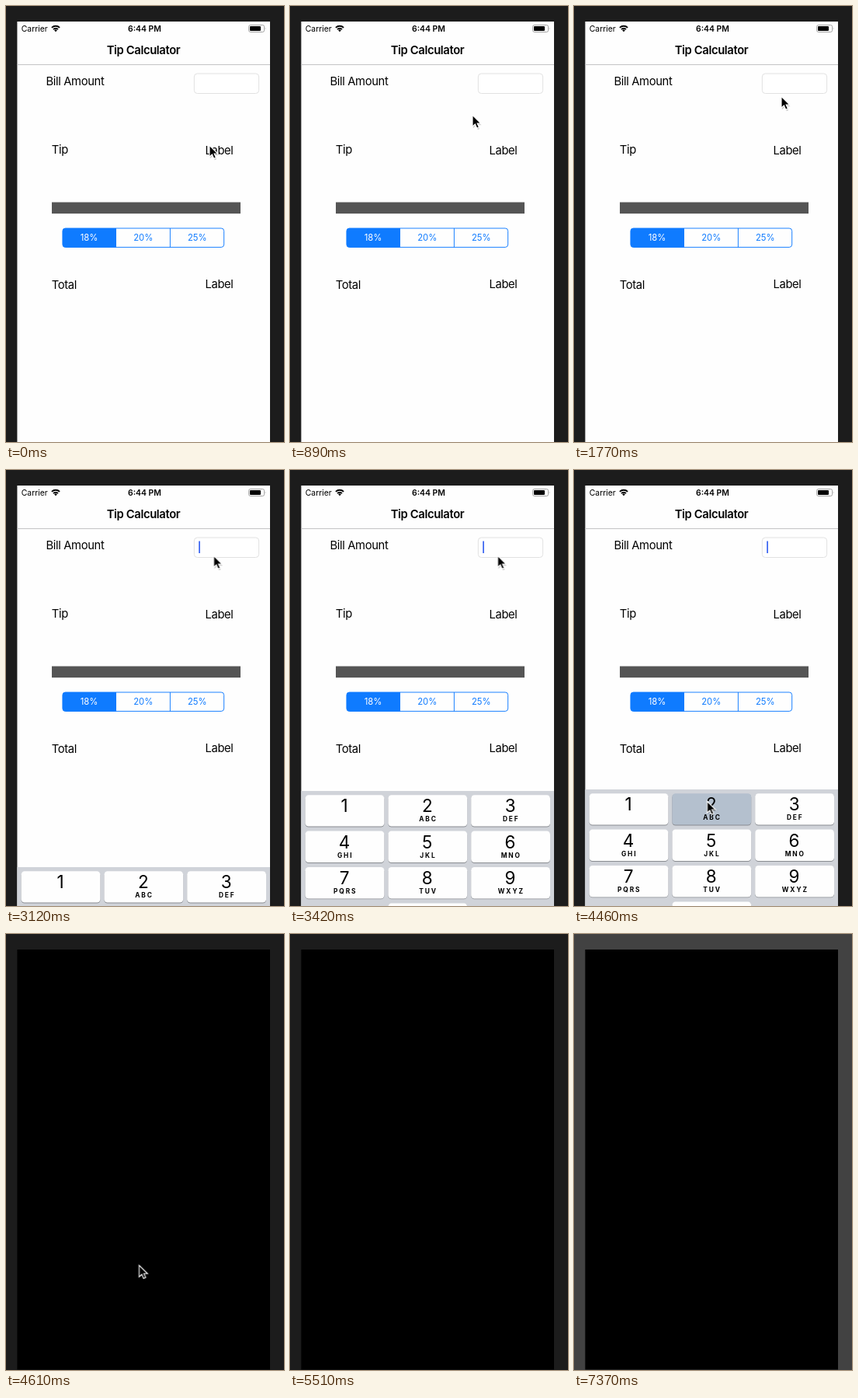
These frames come from a looping animation (358 by 561 pixels, 7.47 s). An HTML page:

```html
<!DOCTYPE html>
<html lang="en">
<head>
<meta charset="utf-8">
<title>Tip Calculator</title>
<style>
html, body { margin: 0; width: 100%; height: 100%; overflow: hidden; background: #1c1c1c; }
svg { display: block; width: 358px; height: 561px; font-family: Inter, Roboto, sans-serif; }
.label { font-size: 14.77px; letter-spacing: -.356px; }
.title { font-weight: 600; }
.status { font-size: 10.43px; }
.mid { text-anchor: middle; }
.segment { font-size: 11.3px; fill: #0f7bff; }
.digit { font-size: 22.5px; }
.letters { font-size: 8.4px; font-weight: 700; letter-spacing: 1.9px; }
.anim { animation: 7470ms step-end infinite; }
#frame { fill: #1c1c1c; animation-name: flash; }
#screen { animation-name: crash; }
#caret { animation-name: caret; }
#keyboard { animation-name: slide; }
#key2 { animation-name: press; }
#cursor { animation-name: move; }

@keyframes flash { 0% { fill: #1c1c1c } 98.66%, 100% { fill: #424242 } }
@keyframes crash { 0% { visibility: visible } 61.71%, 100% { visibility: hidden } }
@keyframes caret { 0% { opacity: 0 } 41.76%, 100% { opacity: 1 } }
@keyframes press { 0% { fill: #fefefe } 59.7%, 100% { fill: #b4c0ce } }
@keyframes slide {
  0% { transform: translateY(160px) }
  41.76% { transform: translateY(100px) }
  43.77% { transform: translateY(14px) }
  45.78% { transform: translateY(2px) }
  47.79%, 100% { transform: none }
}
@keyframes move {
  0% { transform: translate(262px, 179px) }
  2% { transform: translate(244px, 164px) }
  4.01% { transform: translate(229px, 151px) }
  6.02% { transform: translate(232px, 154px) }
  10.04% { transform: translate(235px, 140px) }
  12.04% { transform: translate(243px, 120px) }
  14.05% { transform: translate(252px, 98px) }
  16.06% { transform: translate(258px, 84px) }
  18.07% { transform: translate(261px, 81px) }
  20.08% { transform: translate(264px, 92px) }
  21.68% { transform: translate(266px, 106px) }
  23.69% { transform: translate(267px, 116px) }
  25.7% { transform: translate(265px, 107px) }
  27.71% { transform: translate(263px, 100px) }
  29.71% { transform: translate(265px, 104px) }
  31.72% { transform: translate(267.5px, 110px) }
  47.79% { transform: translate(258px, 165px) }
  49.79% { transform: translate(232px, 255px) }
  51.8% { transform: translate(203px, 345px) }
  53.68% { transform: translate(181px, 405px) }
  55.68% { transform: translate(172px, 424px) }
  57.69% { transform: translate(171.5px, 426px) }
  69.74% { transform: translate(214px, 462px) }
  71.75% { transform: translate(268px, 516px) }
  73.76%, 100% { transform: translate(400px, 600px) }
}
</style>
</head>
<body>
<svg viewBox="0 0 358 561">
  <rect id="frame" class="anim" width="358" height="561"/>
  <rect x="14.4" y="20" width="325.6" height="540.5"/>

  <g id="screen" class="anim">
    <rect x="14.4" y="20" width="325.6" height="541" fill="#fefefe"/>

    <text class="status" x="19.7" y="32.7">Carrier</text>
    <g fill="none" stroke="#000" stroke-width="1.9">
      <path d="M58.9 27.9A7.3 7.3 0 0 1 69.1 27.9M61 30.1A4.4 4.4 0 0 1 67 30.1"/>
    </g>
    <path d="M64 33.2l-1.9-1.9a2.7 2.7 0 0 1 3.8 0z"/>
    <text class="status title mid" x="178.5" y="32.7">6:44 PM</text>
    <rect x="312.6" y="24.5" width="20" height="9" rx="2.2" fill="none" stroke="#999" stroke-width=".9"/>
    <rect x="314" y="25.9" width="14" height="6.2" rx="1"/>
    <path d="M333.8 27.5q1.3 1.5 0 3z" fill="#999"/>

    <text class="label title mid" x="177" y="62">Tip Calculator</text>
    <rect x="14.4" y="75" width="325.6" height="1" fill="#c3c3c5"/>

    <g class="label">
      <text x="51.5" y="102.4">Bill Amount</text>
      <text x="58.8" y="190.4">Tip</text>
      <text x="256.5" y="191.4">Label</text>
      <text x="58.8" y="364.2">Total</text>
      <text x="256.5" y="363.2">Label</text>
    </g>
    <rect x="242.4" y="87" width="83.2" height="25.5" rx="4" fill="#fff" stroke="#dedede" stroke-width=".9"/>
    <rect id="caret" class="anim" x="248.2" y="91.5" width="1.8" height="15.5" fill="#426bf2"/>

    <rect x="59" y="252.5" width="243" height="14.6" fill="#555"/>
    <path d="M142 286H76.5a3.5 3.5 0 0 0-3.5 3.5V307a3.5 3.5 0 0 0 3.5 3.5H142z" fill="#0f7bff"/>
    <g fill="none" stroke="#0f7bff" stroke-width=".95">
      <rect x="72.9" y="286" width="207.8" height="24.4" rx="3.5"/>
      <path d="M211.4 286v24.4"/>
    </g>
    <g class="segment mid">
      <text x="107" y="302.1" fill="#fff" style="fill:#fff">18%</text>
      <text x="176.7" y="302.1">20%</text>
      <text x="246.3" y="302.1">25%</text>
    </g>

    <g id="keyboard" class="anim">
      <rect x="14.4" y="411" width="325.6" height="300" fill="#d0d3d9"/>
    </g>
  </g>

  <g id="cursor" class="anim">
    <path d="M.8 2.2v15l3.6-3.2 2.4 5.2 2.4-1-2.3-5h4.7z" fill="#000" opacity=".18"/>
    <path d="M0 .4V15.2L3.4 12 5.7 17.2 8.4 16 6.1 11H10.8z" stroke="#fff" stroke-width="1.1"/>
  </g>
</svg>
<script>
const keyboard = document.getElementById('keyboard');
const letters = ['', 'ABC', 'DEF', 'GHI', 'JKL', 'MNO', 'PQRS', 'TUV', 'WXYZ'];

function add(tag, attrs, text = '') {
  const el = document.createElementNS('http://www.w3.org/2000/svg', tag);
  for (const name in attrs) el.setAttribute(name, attrs[name]);
  el.textContent = text;
  keyboard.append(el);
  return el;
}

function addKey(digit, col, row, sub) {
  const x = 19.6 + col * 106.8, y = 416.2 + row * 46.4;
  const box = { x, width: 101.8, height: 40.4, rx: 4.3 };
  add('rect', { ...box, y: y + 0.9, fill: '#898c91' });
  add('rect', { ...box, y, fill: '#fefefe', id: 'key' + digit, class: 'anim' });
  add('text', { x: x + 50.4, y: y + 22.2, class: 'digit mid' }, digit);
  add('text', { x: x + 51.6, y: y + 34, class: 'letters mid' }, sub);
}

letters.forEach((sub, i) => addKey(i + 1, i % 3, Math.floor(i / 3), sub));
addKey(0, 1, 3, '');
</script>
</body>
</html>
```
